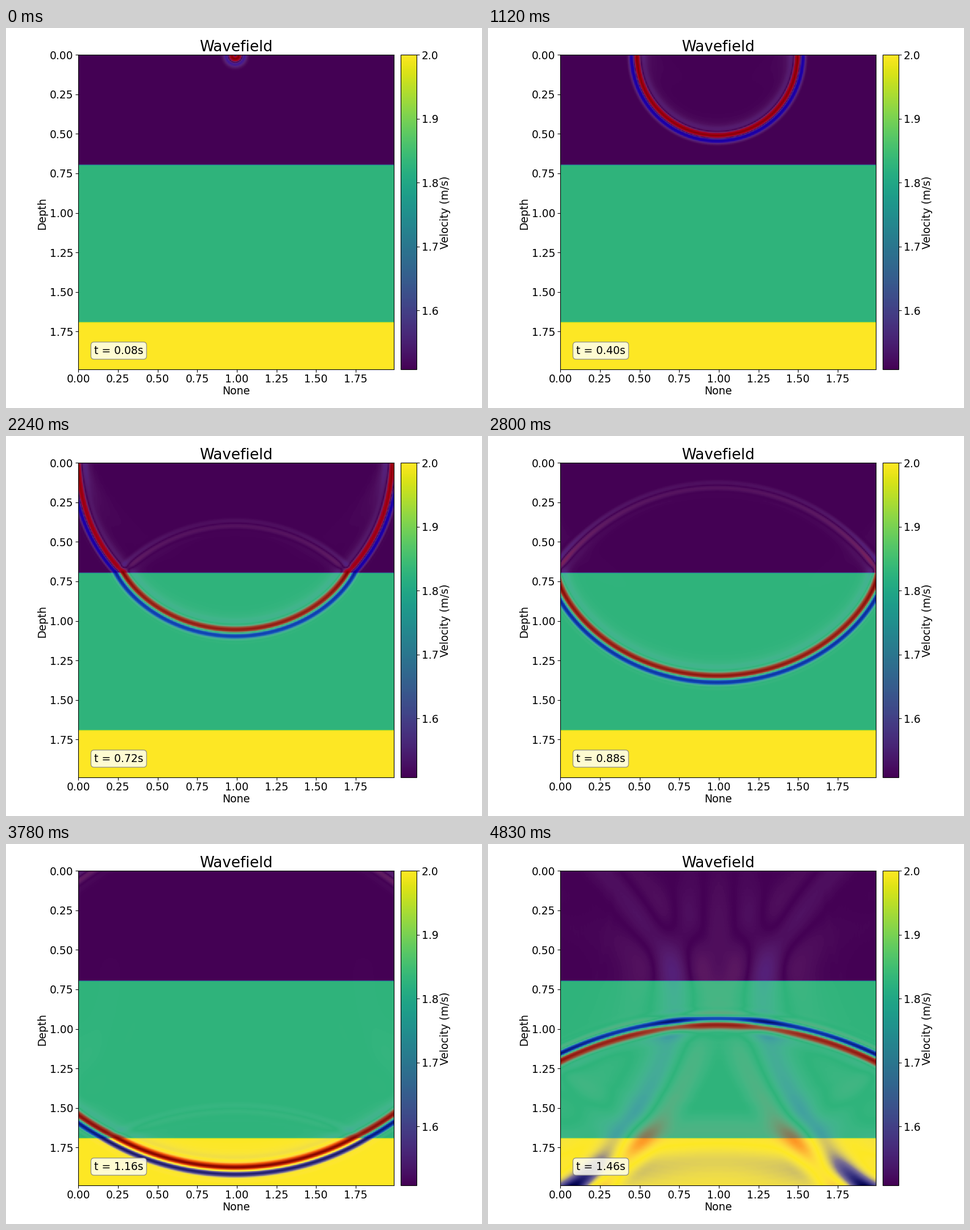
Animation of 837 by 669 pixels, one loop 4900 ms. Source, as a matplotlib script:

```python
import numpy as np
import matplotlib.pyplot as plt
from matplotlib.animation import FuncAnimation
from matplotlib.colors import ListedColormap

W, H, DPI = 837, 669, 64
PT = 72 / DPI                       # points per pixel
FRAMES, INTERVAL = 70, 70
T_START, T_STEP = 0.08, 0.02

# wave model: cells, absorbing border, stencil halo
N, PAD, HALO = 200, 40, 4
DX, DT = 0.01, 0.002
PEAK_FREQ, PEAK_TIME = 18.5, 0.0585
SRC = (PAD, PAD + 99)
STENCIL = (-205 / 72, 8 / 5, -1 / 5, 8 / 315, -1 / 560)


def layers():
    vel = np.full((N, N), 1.5076)
    vel[70:] = 1.828
    vel[170:] = 2.0
    return vel


def border_damping():
    depth = (PAD - np.arange(PAD) + 1) / PAD
    ramp = depth - np.sin(2 * np.pi * depth) / (2 * np.pi)
    line = np.zeros(N + 2 * PAD)
    line[:PAD] = ramp
    line[-PAD:] = ramp[::-1]
    strength = 1.5 * np.log(1000) / PAD / DX
    return strength * (line[:, None] + line[None, :])


def laplacian(u):
    p = np.pad(u, HALO)
    n = len(u)
    mid = slice(HALO, HALO + n)
    out = 2 * STENCIL[0] * u
    for k in range(1, HALO + 1):
        lo, hi = slice(HALO - k, HALO - k + n), slice(HALO + k, HALO + k + n)
        out += STENCIL[k] * (p[lo, mid] + p[hi, mid] + p[mid, lo] + p[mid, hi])
    return out / DX**2


def ricker(t):
    a = (np.pi * PEAK_FREQ * (t - PEAK_TIME)) ** 2
    return (1 - 2 * a) * np.exp(-a)


def simulate(vel):
    c2 = np.pad(vel, PAD, mode="edge") ** 2
    g = border_damping() * c2 * DT / 2
    prev, cur = np.zeros_like(c2), np.zeros_like(c2)
    first, every = round(T_START / DT), round(T_STEP / DT)
    inner = slice(PAD, PAD + N)
    shots = []
    for step in range(first + every * (FRAMES - 1) + 1):
        if step >= first and (step - first) % every == 0:
            shots.append(cur[inner, inner].copy())
        force = laplacian(cur)
        force[SRC] += ricker(step * DT) / DX**2
        nxt = (2 * cur - (1 - g) * prev + c2 * DT**2 * force) / (1 + g)
        prev, cur = cur, nxt
    return shots


def fading_seismic():
    rgba = plt.get_cmap("seismic")(np.linspace(0, 1, 256))
    rgba[:, 3] = np.abs(np.linspace(-1, 1, 256))
    return ListedColormap(rgba)


def add_axes(left, top, right, bottom):
    return fig.add_axes([left / W, 1 - bottom / H,
                         (right - left) / W, (bottom - top) / H])


def label(x, y, text, size=18.8, **kw):
    fig.text(x / W, 1 - y / H, text, fontsize=size * PT, ha="center", **kw)


plt.rcParams.update({
    "font.family": "DejaVu Sans",
    "font.size": 18.8 * PT,
    "axes.linewidth": 1.1 * PT,
})

vel = layers()
shots = simulate(vel)

fig = plt.figure(figsize=(W / DPI, H / DPI), dpi=DPI, facecolor="white")
ax = add_axes(127.3, 47.2, 681.7, 601.2)
cax = add_axes(694, 47.2, 721.7, 601.2)

view = dict(extent=(0, 1.99, 1.99, 0), aspect="auto")
ground = ax.imshow(vel, cmap="viridis", **view)
wave = ax.imshow(shots[0], cmap=fading_seismic(), **view)

ticks = np.arange(0, 2, 0.25)
ax.set_xticks(ticks, [f"{v:.2f}" for v in ticks])
ax.set_yticks(ticks, [f"{v:.2f}" for v in ticks])
fig.colorbar(ground, cax=cax, ticks=[1.6, 1.7, 1.8, 1.9, 2.0])
for a in (ax, cax):
    a.tick_params(length=4.6 * PT, width=1.1 * PT, pad=4.6 * PT)
ax.tick_params(axis="x", pad=2.8 * PT)

label(404.5, 41, "Wavefield", size=26.1, va="baseline")
label(404.5, 645, "None", va="baseline")
label(64, 326, "Depth", rotation=90, va="center")
label(772, 325, "Velocity (m/s)", rotation=90, va="center")

clock = ax.text(0.05, 0.05, "", transform=ax.transAxes,
                bbox=dict(boxstyle="round,pad=0.3", facecolor="ivory",
                          edgecolor="gray", alpha=0.85, linewidth=1.3 * PT))


def update(i):
    u = shots[i]
    peak = np.abs(u).max()
    wave.set_data(u)
    wave.set_clim(-peak, peak)
    clock.set_text(f"t = {T_START + T_STEP * i:.2f}s")
    return wave, clock


anim = FuncAnimation(fig, update, frames=FRAMES, interval=INTERVAL,
                     repeat=True, repeat_delay=0)
plt.show()
```
